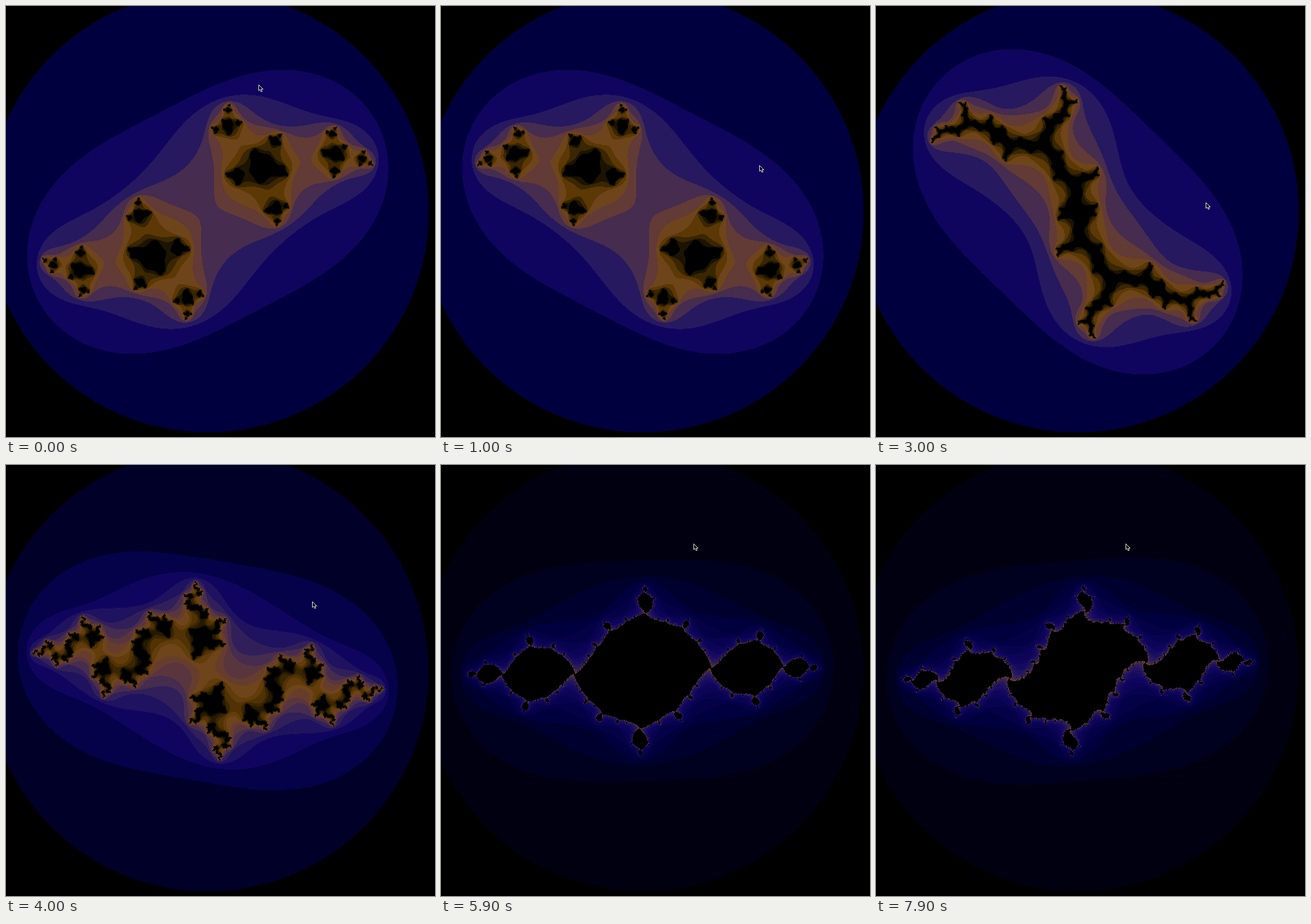
Write an HTML page with a canvas that moves like this. It is 600x604 px and loops after 8 s.

```html
<!DOCTYPE html>
<html lang="en">
<head>
<meta charset="utf-8">
<title>Julia set</title>
<style>
html, body { margin: 0; width: 100%; height: 100%; overflow: hidden; background: #000; }
canvas { display: block; }
</style>
</head>
<body>
<canvas id="view" width="600" height="604"></canvas>
<script>
const W = 600, H = 604, LOOP = 8000, STEP = 100;
const CX = 281.6, CY = 288, SCALE = 154.5;
const ctx = document.getElementById('view').getContext('2d');
const image = ctx.createImageData(W, H);
const pixels = new Uint32Array(image.data.buffer);

// Evenly spaced gradient from far outside to the set itself
const stops = '000000 00003e 10055e 261960 462c4e 623a36 6e441a 5c3804 3a2600 1c1400 000000'
  .split(' ').map(hex => [0, 2, 4].map(i => parseInt(hex.slice(i, i + 2), 16)));

// Turning points of the angle in degrees, where c = e^(i * angle)
const angleKeys = [
  [0, 125], [200, 113], [1000, 235], [1500, 269], [2100, 246], [2550, 209], [3000, 268.3],
  [3250, 280], [4300, 180], [4700, 187.8], [5400, 229], [5900, 176.6], [6300, 152], [LOOP, 171]
];

// Time, x and y of the pointer
const pointerKeys = [
  [0, 353, 110], [1000, 445, 223], [2100, 428, 312], [3000, 461, 275],
  [4700, 395, 141], [5900, 353, 110], [LOOP, 349, 110]
];

function slope(keys, i, col) {
  if (i < 1 || i > keys.length - 2) return 0;
  const rate = j => (keys[j + 1][col] - keys[j][col]) / (keys[j + 1][0] - keys[j][0]);
  const a = rate(i - 1), b = rate(i);
  return a * b > 0 ? 2 * a * b / (a + b) : 0;
}

// Smooth curve through the keys that never overshoots them
function curve(keys, t, col = 1) {
  const i = keys.findIndex(key => key[0] > t) - 1;
  const a = keys[i], b = keys[i + 1];
  const d = b[0] - a[0], u = (t - a[0]) / d, w = 1 - u;
  return a[col] * (1 + 2 * u) * w * w + b[col] * (3 - 2 * u) * u * u
    + d * u * w * (w * slope(keys, i, col) - u * slope(keys, i + 1, col));
}

// The iteration limit climbs from 10 to 40 in the middle of the loop
function depthAt(t) {
  const u = Math.min(1, Math.max(0, (t - 3600) / 2300));
  return Math.round(10 + 30 * u);
}

function palette(depth) {
  return Uint32Array.from({ length: depth + 1 }, (_, k) => {
    const p = k / depth * (stops.length - 1);
    const i = Math.min(Math.floor(p), stops.length - 2);
    const [r, g, b] = stops[i].map((v, n) => Math.round(v + (stops[i + 1][n] - v) * (p - i)));
    return (255 << 24 | b << 16 | g << 8 | r) >>> 0;
  });
}

function drawJulia(angle, depth) {
  const cr = Math.cos(angle), ci = Math.sin(angle), colors = palette(depth);
  for (let py = 0, n = 0; py < H; py++) {
    for (let px = 0; px < W; px++, n++) {
      let x = (px - CX) / SCALE, y = (py - CY) / SCALE, k = 0;
      let xx = x * x, yy = y * y;
      while (k < depth && xx + yy <= 4) {
        y = 2 * x * y + ci;
        x = xx - yy + cr;
        xx = x * x;
        yy = y * y;
        k++;
      }
      pixels[n] = colors[k];
    }
  }
  ctx.putImageData(image, 0, 0);
}

const arrow = new Path2D('M0 0V8L2 6.5 3.3 9.5 4.8 9 3.6 6H6Z');

function drawPointer(x, y) {
  ctx.save();
  ctx.translate(Math.round(x) + 0.5, Math.round(y) + 0.5);
  ctx.fillStyle = '#000';
  ctx.fill(arrow);
  ctx.strokeStyle = '#ddd';
  ctx.lineWidth = 0.9;
  ctx.stroke(arrow);
  ctx.restore();
}

let shown = -1;
function frame() {
  const t = Math.floor(performance.now() % LOOP / STEP) * STEP;
  if (t !== shown) {
    shown = t;
    drawJulia(curve(angleKeys, t) * Math.PI / 180, depthAt(t));
    drawPointer(curve(pointerKeys, t, 1), curve(pointerKeys, t, 2));
  }
  requestAnimationFrame(frame);
}
frame();
</script>
</body>
</html>
```
